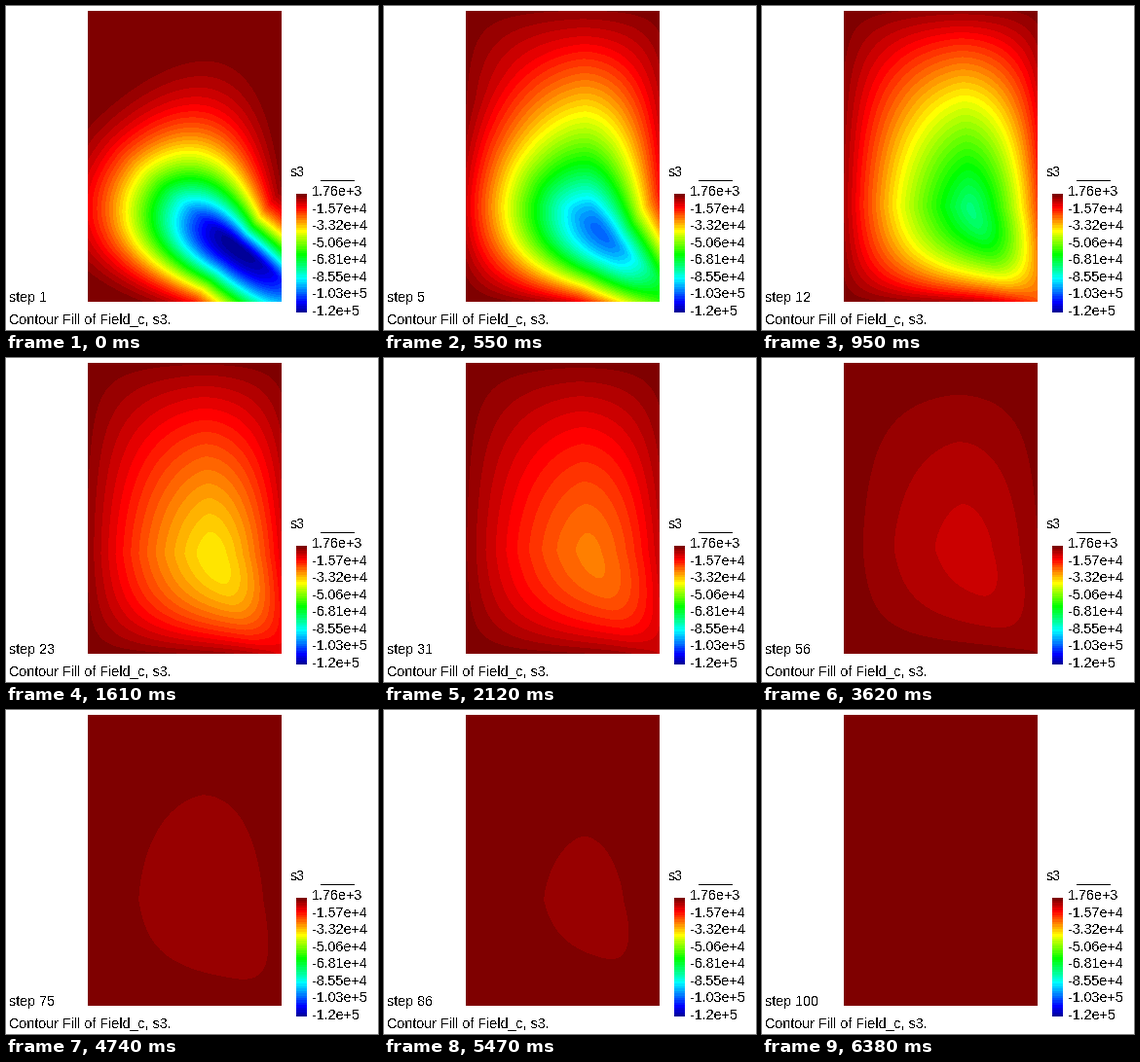
These frames come from a looping animation (382x333 px, 6910 ms). A matplotlib script:

```python
import matplotlib.pyplot as plt
import numpy as np
from matplotlib.animation import FuncAnimation

W, H, DPI = 382, 333, 100
LOOP, TICK = 6910, 10
X0, X1, Y0, Y1 = 84, 283, 5, 304
BANDS = 50

plt.rcParams["font.family"] = "Liberation Sans"
plt.rcParams["text.antialiased"] = False

# Palette: dark red, red, yellow, green, cyan, blue, dark blue
stops = [0, 0.1, 0.3, 0.5, 0.7, 0.9, 1]
ramp = np.arange(BANDS) / BANDS
palette = np.stack([
    np.interp(ramp, stops, [127, 255, 255, 0, 0, 0, 0]),
    np.interp(ramp, stops, [0, 0, 255, 255, 255, 0, 0]),
    np.interp(ramp, stops, [0, 0, 0, 0, 255, 255, 127]),
], axis=-1).astype(np.uint8)

px, py = np.meshgrid(np.arange(X0, X1) + 0.5, np.arange(Y0, Y1) + 0.5)
corner = (px - X0) / (X1 - X0) * (py - Y0) / (Y1 - Y0)


def loaded():
    """Skewed bell that widens up-left, away from the lower right corner."""
    dx, dy, tilt = px - 237, py - 247, np.radians(38)
    along = -dx * np.cos(tilt) - dy * np.sin(tilt)
    across = dx * np.sin(tilt) - dy * np.cos(tilt)
    spread = np.maximum(along, 0)
    length = np.where(along > 0, 100, 130)
    side = np.where(across > 0,
                    (np.abs(across) / (28 + 0.35 * spread)) ** 1.5,
                    (np.abs(across) / (46 + 0.2 * spread)) ** 2.2)
    bell = 2 ** -((np.abs(along) / length) ** 2.2 + side)
    return np.clip((bell - 0.03) / 0.97, 0, 1)


def slope(d, low, high, p_low, p_high):
    """Fall from 1 at d = 0 to 0 at -low and +high."""
    fall = np.where(d < 0, np.abs(d / low) ** p_low, np.abs(d / high) ** p_high)
    return np.clip(1 - fall, 0, 1)


def egg(k):
    """Settled shape; k from 0 to 1 lifts the centre and rounds the top."""
    cx, cy = 213 - 5 * k, 207 - 11 * k
    dy = py - cy
    ridge = cx + np.where(dy > 0, 0.4, 0.05) * dy
    q = (slope(px - ridge, ridge - 76, 298 - ridge, 1.5, 1.9)
         * slope(dy, cy + 4, 308 - cy, 1.5, 2.55))
    return 1 - (1 - q) ** (0.75 + 0.25 * k) + 0.25 * corner ** 6


start = loaded()


def shape(step):
    s = egg(np.clip((step - 12) / 24, 0, 1))
    if step < 12:
        s = start + (s - start) * ((step - 1) / 11) ** 0.7
    return s / s.max()


def peak(step):
    decay = np.log([49.2, 29.8, 14.2, 6.27, 0.26])
    return 0.69 + np.exp(np.interp(step, [1, 12, 23, 40, 100], decay))


base = np.full((H, W, 3), 255, np.uint8)
bar_rows = np.arange(193, 315)
base[193:315, 298:309] = palette[(bar_rows - 193) * BANDS // 122][:, None]
base[179, 323:358] = 0


def picture(step):
    img = base.copy()
    band = np.clip(peak(step) * shape(step), 0, BANDS - 1).astype(int)
    img[Y0:Y1, X0:X1] = palette[band]
    return img


pictures = [picture(s) for s in range(1, 101)]


def step_at(t):
    if t < 410:
        return 1
    return int(np.interp(t, [410, 4740, 6380], [3, 75, 100]) + 0.1)


fig = plt.figure(figsize=(W / DPI, H / DPI), dpi=DPI, facecolor="white")
screen = fig.figimage(pictures[0], 0, 0, origin="upper")


def label(x, y, text):
    return fig.text(x / W, 1 - y / H, text, size=14.2 * 72 / DPI,
                    color="black", va="baseline", ha="left")


label(292, 175, "s3")
label(3, 326, "Contour Fill of Field_c, s3.")
values = ["1.76e+3", "-1.57e+4", "-3.32e+4", "-5.06e+4",
          "-6.81e+4", "-8.55e+4", "-1.03e+5", "-1.2e+5"]
for i, value in enumerate(values):
    label(314, round(195.4 + 17.5 * i), value)
counter = label(3, 304, "step 1")


def update(i):
    step = step_at(i * TICK)
    screen.set_data(pictures[step - 1])
    counter.set_text(f"step {step}")
    return screen, counter


anim = FuncAnimation(fig, update, frames=LOOP // TICK, interval=TICK,
                     repeat=True, repeat_delay=0, blit=False)
plt.show()
```
